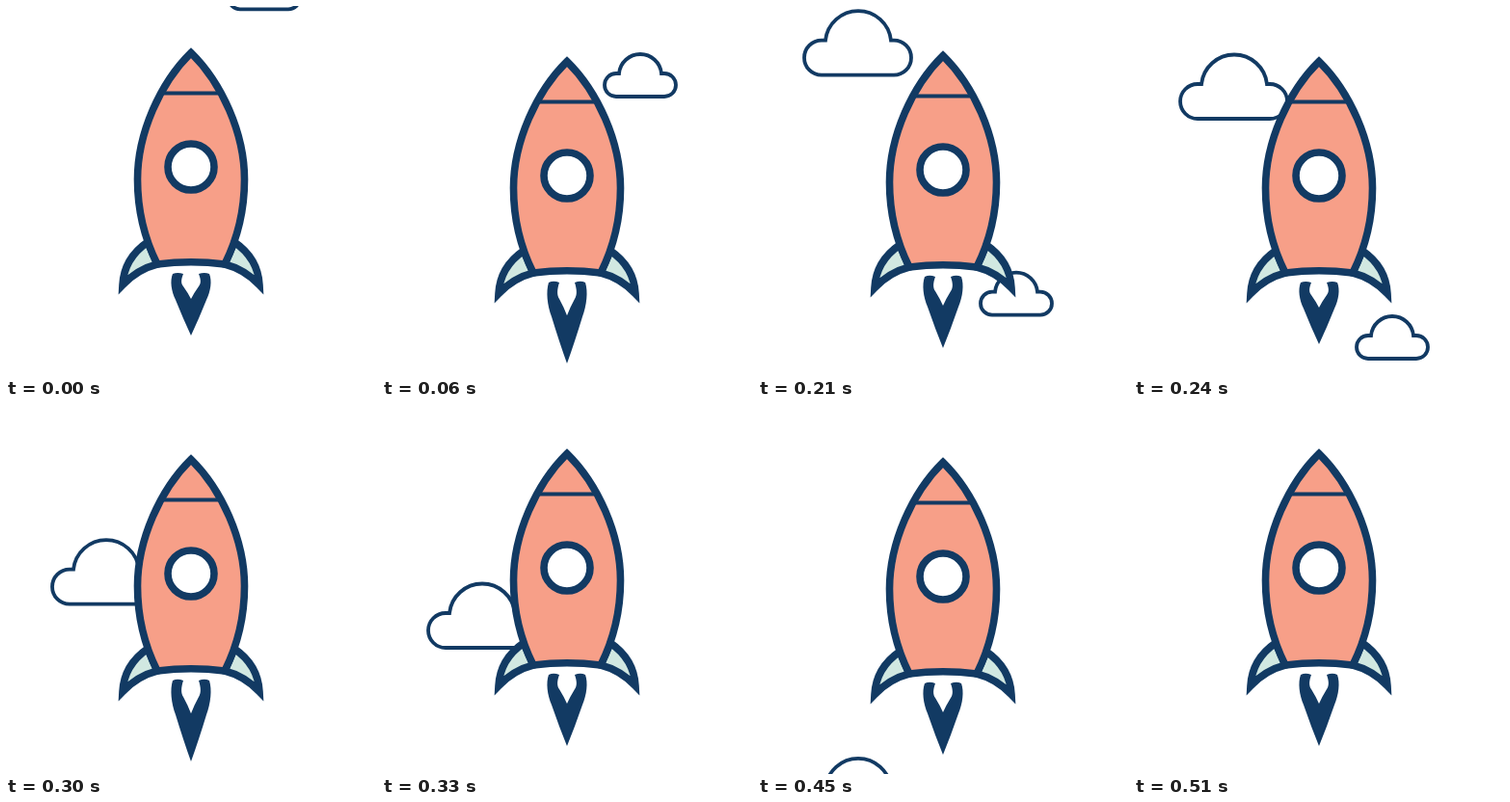
An HTML page for the animation above (540 ms loop, 384 by 384 pixels).

```html
<!DOCTYPE html>
<html lang="en">
<head>
<meta charset="utf-8">
<title>Rocket</title>
<style>
  html, body { margin: 0; width: 100%; height: 100%; overflow: hidden; background: #fff; }
  svg { display: block; width: 100vw; height: 100vh; }
  .line { stroke: #123a63; stroke-width: 7.6; stroke-miterlimit: 10; }
  .cloud { fill: #fff; stroke: #123a63; stroke-width: 3.8; }
  .body { fill: #f79f88; }
  .fin { fill: #d1e8e1; }
  .flame { fill: #123a63; }
</style>
</head>
<body>
<svg viewBox="0 0 384 384">
  <path id="cloudR" class="cloud" d="M243 94A12 12 0 0 1 243 70H246A22.1 22.1 0 0 1 290 70H293A12 12 0 0 1 293 94Z"/>
  <path id="cloudL" class="cloud" d="M66 117A18 18 0 0 1 66 81H70A34.2 34.2 0 0 1 138 81H141A18 18 0 0 1 141 117Z"/>
  <g id="rocket">
    <path id="flame" class="flame" d="M173 278Q178 276 184 278C181.500 284 181.500 288 184 291Q189 298 192 304Q195 298 200 291C202.500 288 202.500 284 200 278Q206 276 211 278C214 285 212.500 296 208 305Q200 325 192 342Q184 325 176 305C171.500 296 170 285 173 278Z"/>
    <g class="line">
      <path id="fin" class="fin" d="M147 245C131 256 122 271 121 289.500C132 278 145 271 157 268Z"/>
      <use href="#fin" transform="matrix(-1 0 0 1 384 0)"/>
      <path class="body" d="M192 48.500C160 80 136.500 132 136.500 180C136.500 215 146 246 157 268Q192 263.600 227 268C238 246 247.500 215 247.500 180C247.500 132 224 80 192 48.500Z"/>
      <path d="M161 90.500H223" stroke-width="4" style="stroke-width:4"/>
      <circle cx="192" cy="167" r="24" fill="#fff"/>
    </g>
  </g>
</svg>
<script>
  const STEP = 30, STEPS = 18, FALL = 816 / STEPS, FLAME_TOP = 278;
  const el = id => document.getElementById(id);
  const rocket = el('rocket'), flame = el('flame');
  const cloudL = el('cloudL'), cloudR = el('cloudR');

  const shift = (node, y) => node.setAttribute('transform', `translate(0 ${y})`);
  // Smooth 0..1..0 swing over the given number of steps
  const swing = (k, period) => (1 - Math.cos(2 * Math.PI * k / period)) / 2;

  function draw(now) {
    const k = Math.floor(now / STEP) % STEPS;
    const stretch = 1 + 0.3125 * swing(k, 4);
    shift(rocket, 12 * swing(k, 6));
    flame.setAttribute('transform', `matrix(1 0 0 ${stretch} 0 ${FLAME_TOP * (1 - stretch)})`);
    shift(cloudR, (k - 2) * FALL);
    shift(cloudL, (k - 8) * FALL);
  }

  const start = performance.now();
  function tick() {
    draw(performance.now() - start);
    requestAnimationFrame(tick);
  }
  tick();
</script>
</body>
</html>
```
